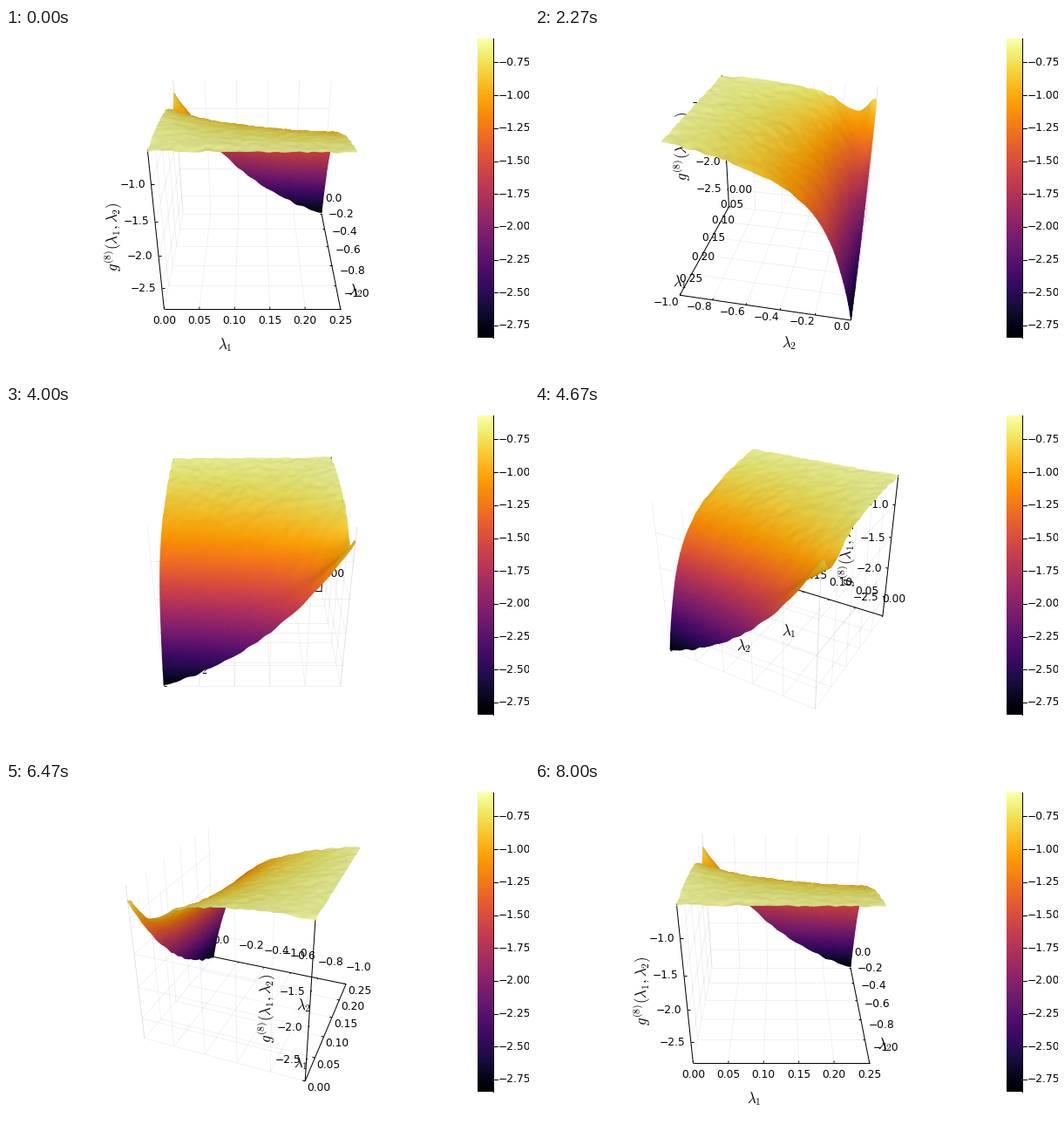
Animation, 600 px wide and 400 px high, one loop 8070 ms. Source, as a matplotlib script:

```python
import numpy as np
import matplotlib.pyplot as plt
from matplotlib.animation import FuncAnimation
from matplotlib.collections import LineCollection, TriMesh
from matplotlib.tri import Triangulation

W, H, DPI = 600, 400, 100
TICK_MS, TICKS = 30, 269      # 8070 ms per loop
STEP_MS = 200 / 3             # the view turns 3 degrees per step
CX, CY = 282.5, 183.5
HALF = 171.5
ELEV = np.radians(30)
FOV = np.radians(15)
DIST = np.sqrt(3) / np.sin(FOV)
SCALE = HALF / np.tan(FOV)
Z_LO, Z_HI = -2.843, -0.5676
N = 56
PX = 72 / DPI
FONT, MATH = 12.2, 16.8

plt.rcParams.update({"font.family": "DejaVu Sans", "mathtext.fontset": "cm"})
cmap = plt.get_cmap("inferno")


def basis(az):
    """Right, up and toward-camera vectors for an azimuth."""
    s, c = np.sin(az), np.cos(az)
    se, ce = np.sin(ELEV), np.cos(ELEV)
    return np.array([[c, s, 0], [-s * se, c * se, ce], [s * ce, -c * ce, se]])


def project(pts, view):
    """Perspective projection of cube points to pixels, plus depth."""
    q = np.asarray(pts, float) @ view.T
    depth = DIST - q[..., 2]
    xy = np.stack([CX + SCALE * q[..., 0] / depth,
                   CY - SCALE * q[..., 1] / depth], axis=-1)
    return xy, depth


def smooth_noise(n, seed):
    a = np.random.default_rng(seed).normal(size=(n, n))
    for axis in (0, 1):
        a = np.apply_along_axis(
            lambda v: np.convolve(np.pad(v, 1, mode="edge"), [1, 2, 1], "valid"), axis, a)
    return a / a.std()


def height(s, t):
    """Surface height in [-1, 1]; s runs along lambda_1, t away from lambda_2 = 0."""
    low = (0.5 * np.exp(-t / 0.25) - 0.32 * np.exp(-(t / 0.06) ** 2)
           + 0.06 * np.exp(-((t - 0.17) / 0.07) ** 2))
    high = 1.15 * np.exp(-t / 0.12) + 0.85 * np.exp(-t / 0.45) - 0.07 * t ** 2
    mix = (1 - np.exp(-1.5 * s)) / (1 - np.exp(-1.5))
    return 1 - low - (high - low) * mix


# surface mesh
line = np.linspace(-1, 1, N)
X, Y = np.meshgrid(line, line, indexing="ij")
Z = height((X + 1) / 2, (1 - Y) / 2) + 0.005 * smooth_noise(N, 8)
Z = np.clip(Z, -1, 1)
P = np.stack([X, Y, Z], axis=-1).reshape(-1, 3)
idx = np.arange(N * N).reshape(N, N)
a, b, c, d = (q.ravel() for q in (idx[:-1, :-1], idx[1:, :-1], idx[1:, 1:], idx[:-1, 1:]))
tris = np.concatenate([np.stack([a, b, c], axis=1), np.stack([a, c, d], axis=1)])
centers = P[tris].mean(axis=1)
zx, zy = np.gradient(Z, line, line)
normals = np.stack([-zx, -zy, np.ones_like(Z)], axis=-1).reshape(-1, 3)
normals /= np.linalg.norm(normals, axis=1, keepdims=True)
base_rgb = cmap((P[:, 2] + 1) / 2)[:, :3]

# ticks in cube coordinates
x_vals = np.arange(6) * 0.05
y_vals = np.arange(-5, 1) * 0.2
z_vals = np.array([-1.0, -1.5, -2.0, -2.5])
xt = x_vals * 8 - 1
yt = y_vals * 2 + 1
zt = (z_vals - Z_LO) / (Z_HI - Z_LO) * 2 - 1

grid3 = np.array(
    [[(v, -1, -1), (v, 1, -1)] for v in xt]
    + [[(v, 1, -1), (v, 1, 1)] for v in xt]
    + [[(-1, v, -1), (1, v, -1)] for v in yt]
    + [[(-1, v, -1), (-1, v, 1)] for v in yt]
    + [[(-1, 1, v), (1, 1, v)] for v in zt]
    + [[(-1, -1, v), (-1, 1, v)] for v in zt])
T = 0.03
axes3 = np.array(
    [[(-1, -1, -1), (1, -1, -1)], [(1, -1, -1), (1, 1, -1)],
     [(-1, -1, -1), (-1, -1, 1)]]
    + [[(v, -1, -1), (v, -1 + T, -1)] for v in xt]
    + [[(1, v, -1), (1 - T, v, -1)] for v in yt]
    + [[(-1, -1, v), (-1 + T, -1, v)] for v in zt])

# stage
fig = plt.figure(figsize=(W / DPI, H / DPI), dpi=DPI, facecolor="white")
ax = fig.add_axes([0, 0, 1, 1])

grid = LineCollection([], colors=[(0, 0, 0, 0.07)], linewidths=0.8 * PX, zorder=1)
frame = LineCollection([], colors="black", linewidths=PX, zorder=2)
for coll in (grid, frame):
    ax.add_collection(coll, autolim=False)
surface = []


def label(s, size=FONT, **kw):
    return ax.text(0, 0, s, fontsize=size * PX, va="center", zorder=3, **kw)


def fmt(v, digits):
    return f"{v:.{digits}f}".replace("-", "\u2212")


x_ticks = [(label(fmt(v, 2)), (p, -1, -1)) for v, p in zip(x_vals, xt)]
y_ticks = [(label(fmt(v, 1)), (1, p, -1)) for v, p in zip(y_vals, yt)]
z_ticks = [(label(fmt(v, 1)), (-1, -1, p)) for v, p in zip(z_vals, zt)]
names = [
    (label(r"$\lambda_1$", MATH, ha="center"), (0, -1, -1), (-31, 41)),
    (label(r"$\lambda_2$", MATH, ha="center"), (1, 0, -1), (30, 41)),
    (label(r"$g^{(8)}(\lambda_1, \lambda_2)$", MATH, ha="center", rotation=90),
     (-1, -1, 0), (-50, 1)),
]

# colour bar
TOP, BOT, LEFT, RIGHT = 12, 355, 540.5, 558.5
ax.imshow(np.linspace(1, 0, 256)[:, None], cmap=cmap, aspect="auto",
          extent=(LEFT, RIGHT, BOT, TOP), zorder=1)
ax.plot([RIGHT, RIGHT], [TOP, BOT], color="black", lw=PX)
for v in np.arange(-0.75, -2.8, -0.25):
    y = TOP + (Z_HI - v) / (Z_HI - Z_LO) * (BOT - TOP)
    ax.plot([RIGHT, RIGHT + 5], [y, y], color="black", lw=PX)
    label(fmt(v, 2), ha="left").set_position((RIGHT + 6.5, y))
ax.set_xlim(0, W)
ax.set_ylim(H, 0)
ax.axis("off")


def tick_style(facing, side):
    """Alignment and pixel offset for labels of a floor axis."""
    if facing > 0.01:
        if abs(side) < 0.01:
            return "center", 0, 14
        return ("left", 2, 8) if side > 0 else ("right", -0.5, 8)
    if abs(facing) < 0.01:
        return "left", 4, -17
    return "left", -0.5, -19


def place(ticks, view, style):
    ha, dx, dy = style
    for text, p in ticks:
        (x, y), _ = project(p, view)
        text.set_ha(ha)
        text.set_position((x + dx, y + dy))


def draw_surface(view):
    """Depth-sorted triangles, shaded by a light at the camera."""
    while surface:
        surface.pop().remove()
    xy, _ = project(P, view)
    _, depth = project(centers, view)
    mesh = TriMesh(Triangulation(xy[:, 0], xy[:, 1], tris[np.argsort(-depth)]), zorder=5)
    light = 0.78 + 0.22 * np.abs(normals @ view[2])
    mesh.set_facecolor(base_rgb * light[:, None])
    surface.append(ax.add_collection(mesh, autolim=False))


def draw(i):
    step = int((i * TICK_MS + 25) / STEP_MS)
    az = np.radians(3 * step)
    s, c = np.sin(az), np.cos(az)
    view = basis(az)

    grid.set_segments(project(grid3, view)[0])
    frame.set_segments(project(axes3, view)[0])
    draw_surface(view)

    place(x_ticks, view, tick_style(c, -s))
    place(y_ticks, view, tick_style(s, c))
    place(z_ticks, view, ("right", -6.5, 0))
    for text, p, (dx, dy) in names:
        (x, y), _ = project(p, view)
        text.set_position((x + dx, y + dy))
    return []


anim = FuncAnimation(fig, draw, frames=TICKS, interval=TICK_MS,
                     repeat=True, repeat_delay=0, blit=False)
plt.show()
```
